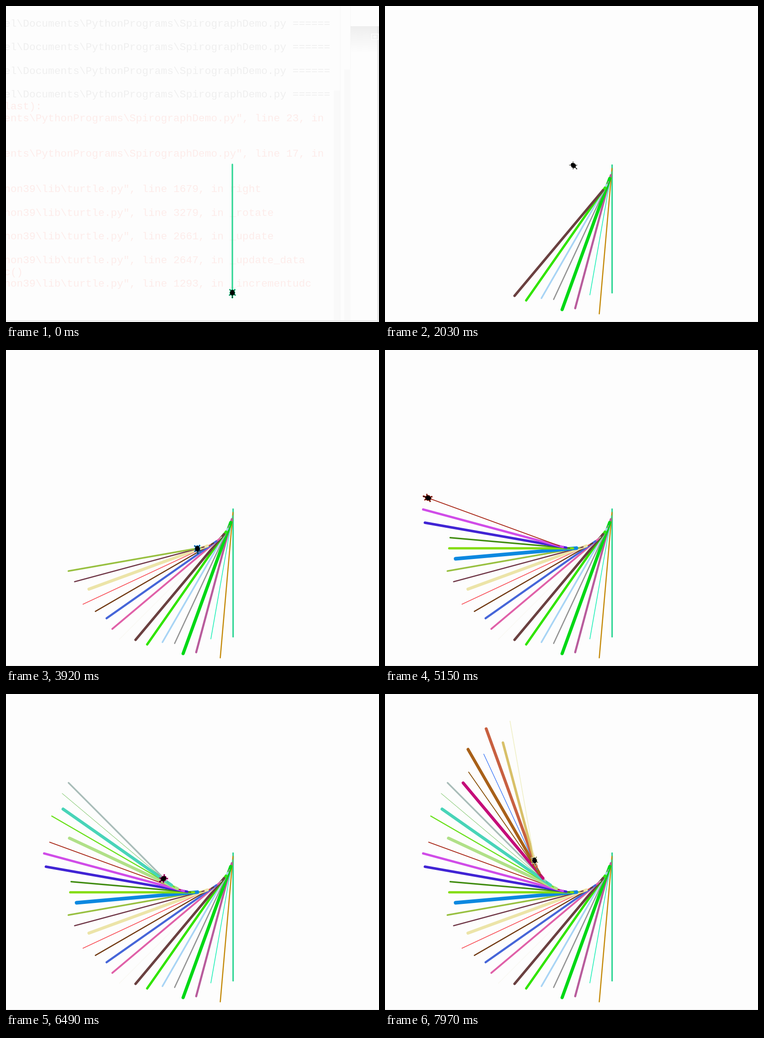
Write an HTML page with a canvas that moves like this. It is 814 by 688 pixels and loops after 8 s.

```html
<!DOCTYPE html>
<html lang="en">
<head>
<meta charset="utf-8">
<title>Turtle spirograph</title>
<style>
html, body { margin: 0; width: 100%; height: 100%; overflow: hidden; background: #fdfdfd; }
canvas { display: block; }
</style>
</head>
<body>
<canvas id="stage" width="814" height="688"></canvas>
<script>
const ctx = document.getElementById('stage').getContext('2d');
const LOOP = 8000, CX = 410.2, CY = 346.3, R = 85.4, RAD = Math.PI / 180;

const colors = ('2fd695 c48a0a 22f0b8 b85c9c 00d815 949494 a8d4f5 30e400 6a4040 faf9f4 ' +
  'e060a8 4565d8 703810 f85058 ece4a8 703848 98c040 0c88e0 84dc0c 408c10 4024d4 d04ce8 ' +
  'a82818 b0e088 68e018 48d4b8 60b848 a8bcb8 c40c78 885008 a86018 3c78f8 c86040 d8c068 ' +
  'f0f0c8').split(' ').map(c => '#' + c);
const lengths = [278, 317.6, 272, 300, 303.7, 283, 285.4, 300, 300, 316, 304.3, 292.7,
  297.8, 307, 275, 292.6, 293.3, 264.5, 270, 261.5, 313, 315.6, 304, 260, 309, 289,
  303.7, 301.7, 271, 275, 310, 277.6, 319, 271.7, 306.8];
const widths = [3.2, 2.5, 1.6, 4.5, 7, 2.6, 3.6, 5, 5.5, 1.5, 4, 4.5, 2.5, 1.8, 6.5, 2.5,
  3.5, 8, 5, 3.2, 5.5, 5, 1.9, 6.5, 2.5, 6.5, 1, 3.5, 6.5, 1.9, 6.5, 1.4, 6.5, 5.5, 1.7];

// One half of the turtle, from its nose to its tail; the other half is mirrored.
const half = [[0, 16], [2, 14], [1, 10], [4, 7], [7, 9], [9, 8], [6, 5], [7, 1],
  [5, -3], [8, -6], [6, -8], [4, -5], [0, -7]];
const shell = half.concat(half.slice(1, -1).reverse().map(([x, y]) => [-x, y]));

// Each run holds eleven evenly spaced steps between its two times.
const runs = [[80, 840], [930, 1730], [1800, 2590], [2650, 3450], [3510, 4310],
  [4370, 5150], [5230, 6020], [6100, 6880], [6970, 7740], [7810, 8610]];

function stepAt(t) {
  if (t < runs[0][0]) return 0;
  let r = runs.length - 1;
  while (t < runs[r][0]) r--;
  const [from, to] = runs[r];
  const n = Math.floor((t - from) / (to - from) * 10 + 0.12);
  return Math.min(102, 1 + 11 * r + Math.min(10, n));
}

function startOf(k) {
  const a = 5 * k * RAD;
  return [CX + R * Math.cos(a), CY + R * Math.sin(a)];
}

function endOf(k) {
  const a = 5 * k * RAD, [x, y] = startOf(k);
  return [x - lengths[k] * Math.sin(a), y + lengths[k] * Math.cos(a)];
}

function drawRay(k) {
  ctx.strokeStyle = colors[k];
  ctx.lineWidth = widths[k];
  ctx.lineCap = 'round';
  ctx.beginPath();
  ctx.moveTo(...startOf(k));
  ctx.lineTo(...endOf(k));
  ctx.stroke();
}

function drawTurtle([x, y], heading, color) {
  ctx.save();
  ctx.translate(x, y);
  ctx.rotate((heading - 90) * RAD);
  ctx.scale(0.85, 0.85);
  ctx.beginPath();
  shell.forEach(p => ctx.lineTo(...p));
  ctx.closePath();
  ctx.fillStyle = '#000';
  ctx.fill();
  ctx.strokeStyle = color;
  ctx.lineWidth = 1.2;
  ctx.stroke();
  ctx.restore();
}

function rect(color, x, y, w, h) {
  ctx.fillStyle = color;
  ctx.fillRect(x, y, w, h);
}

// The shell window that is fading out behind the drawing.
function drawGhost() {
  rect('#f9f9f9', 715, 184, 14, 501);
  rect('#f9f9f9', 738, 138, 14, 547);
  rect('#f6f6f6', 729, 0, 1, 685);
  rect('#f7f7f7', 751, 0, 1, 138);
  const shade = ctx.createLinearGradient(0, 44, 0, 102);
  shade.addColorStop(0, '#eeeeee');
  shade.addColorStop(1, '#fdfdfd');
  rect(shade, 752, 44, 62, 58);
  rect('#e8e8e8', 810, 44, 4, 644);
  ctx.strokeStyle = '#fff';
  ctx.lineWidth = 1.5;
  ctx.strokeRect(797.5, 61, 15, 12);
  ctx.beginPath();
  ctx.moveTo(801, 67); ctx.lineTo(809, 67);
  ctx.moveTo(805, 64); ctx.lineTo(805, 70);
  ctx.stroke();

  const demo = 'PythonPrograms\\SpirographDemo.py';
  const lib = 'hon39\\lib\\turtle.py", line ';
  const put = (row, text) => ctx.fillText(text, -4, 45 + row * 25.74);
  ctx.font = '22.8px "Liberation Mono", monospace';
  ctx.fillStyle = '#efefef';
  for (let row = 0; row < 8; row += 2) put(row, 'el\\Documents\\' + demo + ' ======');
  ctx.fillStyle = '#fdecea';
  put(7, 'last):');
  put(8, 'ents\\' + demo + '", line 23, in');
  put(11, 'ents\\' + demo + '", line 17, in');
  put(14, lib + '1679, in right');
  put(16, lib + '3279, in _rotate');
  put(18, lib + '2661, in _update');
  put(20, lib + '2647, in _update_data');
  put(21, 'c()');
  put(22, lib + '1293, in _incrementudc');
  rect('#ebebeb', 0, 684, 814, 3);
}

function draw(t) {
  const step = stepAt(t), k = Math.floor(step / 3), phase = step % 3;
  rect('#fdfdfd', 0, 0, 814, 688);
  if (step === 0) drawGhost();
  else rect('#e6e6e6', 0, 687, 814, 1);

  ctx.save();
  if (step === 0) ctx.translate(-1.6, -1.4);
  for (let i = 0; i <= k; i++) drawRay(i);
  const next = Math.min(k + 1, 34);
  if (step === 102) drawTurtle(startOf(k), 5 * k + 270, colors[k]);
  else if (phase === 0) drawTurtle(endOf(k), 5 * k + 90, colors[k]);
  else {
    const out = phase === 2 && k >= 12;
    drawTurtle(out ? startOf(next) : [CX, CY], 5 * next, colors[next]);
  }
  ctx.restore();
}

const begin = performance.now();
function tick() {
  draw((performance.now() - begin) % LOOP);
  requestAnimationFrame(tick);
}
tick();
</script>
</body>
</html>
```
